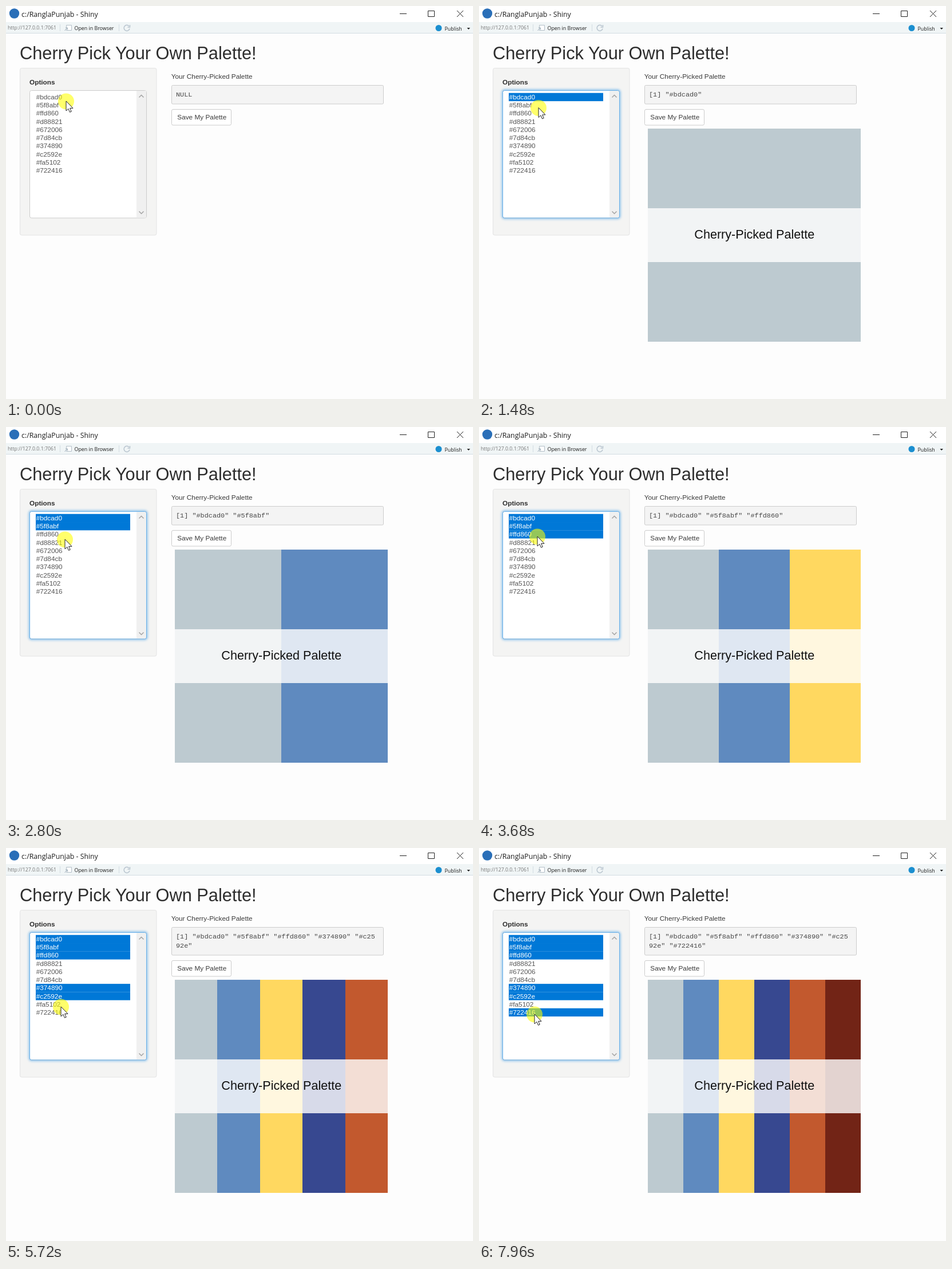
Recreate the animation shown at these times as an HTML page. Size 816 by 686 pixels, loop 8000 ms.

```html
<!DOCTYPE html>
<html lang="en">
<head>
<meta charset="utf-8">
<title>Cherry Pick Your Own Palette!</title>
<style>
  html, body { margin: 0; width: 100%; height: 100%; overflow: hidden; background: #fdfdfd; }
  svg { display: block; width: 816px; height: 686px; }
  text { font: 11.8px "Liberation Sans", Arial, sans-serif; fill: #3a3a3a; }
  .ui { font: 8.85px "Open Sans", "Noto Sans", sans-serif; fill: #1c1c1c; }
  .mono { font: 11.83px "Liberation Mono", "Courier New", monospace; fill: #484848; }
  .line { fill: none; stroke: #222; }
  .box { fill: #fff; stroke: #ccc; }
  .focus { fill: none; stroke: #66afe9; }
</style>
</head>
<body>
<svg viewBox="0 0 816 686">
  <defs>
    <filter id="blur" x="-10%" y="-10%" width="120%" height="120%"><feGaussianBlur stdDeviation="2"/></filter>
  </defs>

  <!-- window frame -->
  <rect width="816" height="28" fill="#fff"/>
  <circle cx="14.5" cy="13" r="8.7" fill="#2a6fb8"/>
  <text class="ui" x="27" y="18.5" style="font-size:12.3px">c:/RanglaPunjab - Shiny</text>
  <path class="line" d="M688 13.5H700M737.5 8.5H748.5V18.5H737.5ZM788 8L799 19M799 8L788 19"/>

  <!-- toolbar -->
  <rect y="28" width="816" height="19" fill="#f0f5f6"/>
  <path class="line" d="M0 47.5H816M94.5 32V44M197.5 32V44" style="stroke:#d3dce2"/>
  <text class="ui" x="3" y="41" style="font-size:8.75px;fill:#777">http://127.0.0.1:7061</text>
  <path d="M105.5 33.5H114.5V42.5H105.5Z" fill="#fff" stroke="#b3bfc8"/>
  <path d="M102.5 43L107 38.5M104 38H107.5V41.5" class="line" style="stroke:#9aaab6"/>
  <text class="ui" x="119.5" y="42">Open in Browser</text>
  <path d="M215 35.2A5 5 0 1 0 216 39.5M216.5 33V37H212.5" class="line" style="stroke:#b9c5cf;stroke-width:1.5"/>
  <circle cx="756" cy="38.5" r="5.5" fill="#1b8fd0"/>
  <text class="ui" x="766.5" y="42.5">Publish</text>
  <path d="M805.5 38H811L808.2 41Z" fill="#222"/>

  <!-- page -->
  <text x="24" y="93" style="font-size:30.75px;fill:#2d2d2d">Cherry Pick Your Own Palette!</text>
  <rect x="24.5" y="108.5" width="238.5" height="291.5" rx="3" fill="#f4f4f3" stroke="#e3e3e3"/>
  <text x="41" y="137" style="font-weight:bold;fill:#2d2d2d">Options</text>
  <g id="glow"><rect class="focus" x="41.5" y="147.5" width="204" height="222.5" rx="3" stroke-width="3" filter="url(#blur)"/></g>
  <rect class="box" x="41.5" y="147.5" width="204" height="222.5" rx="3"/>
  <rect x="228" y="148" width="17" height="221.5" fill="#f0f0f0"/>
  <path class="line" d="M232.5 159.5L236.5 155.5L240.5 159.5M232.5 358.5L236.5 362.5L240.5 358.5" style="stroke:#a3a3a3;stroke-width:1.5"/>
  <rect id="ring" class="focus" x="41.5" y="147.5" width="204" height="222.5" rx="3"/>
  <g id="list"></g>

  <text x="288.7" y="126.5">Your Cherry-Picked Palette</text>
  <rect id="pre" x="289.5" y="138.5" width="370" height="32.5" rx="2" fill="#f4f4f4" stroke="#ccc"/>
  <text id="out1" class="mono" x="297" y="158"></text>
  <text id="out2" class="mono" x="297" y="174"></text>

  <g id="below">
    <rect class="box" x="289.5" y="180.5" width="104" height="27.5" rx="2.5"/>
    <text x="299.3" y="198">Save My Palette</text>
    <g id="plot">
      <g id="bars" shape-rendering="crispEdges"></g>
      <rect x="295" y="353" width="372" height="94" fill="#fff" fill-opacity=".8"/>
      <text x="481.3" y="406" text-anchor="middle" style="font-size:21.6px;fill:#111">Cherry-Picked Palette</text>
    </g>
  </g>

  <g id="cursor">
    <circle cy=".5" r="14" fill="#ff0" fill-opacity=".58"/>
    <path d="M0 0V17L3.9 13.4L6.5 19.4L9.2 18.2L6.7 12.4H12Z" fill="#fff" stroke="#222"/>
  </g>
</svg>
<script>
const LOOP = 8000, ROW = 14.22, TOP = 151.8;
const options = ['#bdcad0', '#5f8abf', '#ffd860', '#d88821', '#672006',
                 '#7d84cb', '#374890', '#c2592e', '#fa5102', '#722416'];
// option index, time of the click, time the output follows
const picks = [[0, 640, 1080], [1, 1640, 2200], [2, 3040, 3500],
               [6, 4160, 4600], [7, 5080, 5520], [9, 6600, 7080]];
// time, x, y of the pointer tip
const path = [[0, 105, 166], [1360, 105, 166], [1480, 104, 177.5], [1560, 104, 179],
              [2480, 104, 179], [2800, 103, 196], [2960, 102, 191], [3720, 102, 191],
              [4120, 97, 240], [4760, 97, 240], [5020, 97, 257], [5560, 97, 257],
              [5720, 96, 277], [5960, 97, 290], [LOOP, 97, 290]];

const $ = id => document.getElementById(id);
function add(parent, tag, attrs, text = '') {
  const el = document.createElementNS('http://www.w3.org/2000/svg', tag);
  for (const k in attrs) el.setAttribute(k, attrs[k]);
  el.textContent = text;
  return parent.appendChild(el);
}
const show = (el, on) => { el.style.display = on ? '' : 'none'; };

const rows = options.map((name, i) => {
  const y = TOP + i * ROW;
  return {
    mark: add($('list'), 'rect', { x: 52, y, width: 165, height: ROW + .1, fill: '#0078d7' }),
    label: add($('list'), 'text', { x: 52.7, y: y + 11.2 }, name)
  };
});

function pointer(t) {
  const i = Math.max(1, path.findIndex(p => p[0] >= t));
  const [t0, x0, y0] = path[i - 1], [t1, x1, y1] = path[i];
  const u = (t - t0) / (t1 - t0), e = u * u * (3 - 2 * u);
  return [x0 + (x1 - x0) * e, y0 + (y1 - y0) * e];
}

function drawOutput(colors) {
  const n = colors.length;
  const out = n ? '[1] ' + colors.map(c => `"${c}"`).join(' ') : 'NULL';
  $('out1').textContent = out.slice(0, 49);
  $('out2').textContent = out.slice(49);
  const shift = out.length > 49 ? 16 : 0;
  $('pre').setAttribute('height', 32.5 + shift);
  $('below').setAttribute('transform', `translate(0 ${shift})`);
  show($('plot'), n);
  $('bars').replaceChildren();
  colors.forEach((fill, i) =>
    add($('bars'), 'rect', { x: 295 + 372 * i / n, y: 214, width: 372 / n, height: 372, fill }));
}

let shown = -1;
function render(t) {
  const chosen = picks.filter(p => t >= p[1]).map(p => p[0]);
  rows.forEach(({ mark, label }, i) => {
    const on = chosen.includes(i);
    show(mark, on);
    label.style.fill = on ? '#fff' : '#555';
  });
  show($('glow'), chosen.length);
  show($('ring'), chosen.length);

  const colors = picks.filter(p => t >= p[2]).map(p => options[p[0]]);
  if (colors.length !== shown) {
    shown = colors.length;
    drawOutput(colors);
  }
  $('cursor').setAttribute('transform', `translate(${pointer(t)})`);
}

const start = performance.now();
function tick() {
  render((performance.now() - start) % LOOP);
  requestAnimationFrame(tick);
}
tick();
</script>
</body>
</html>
```
